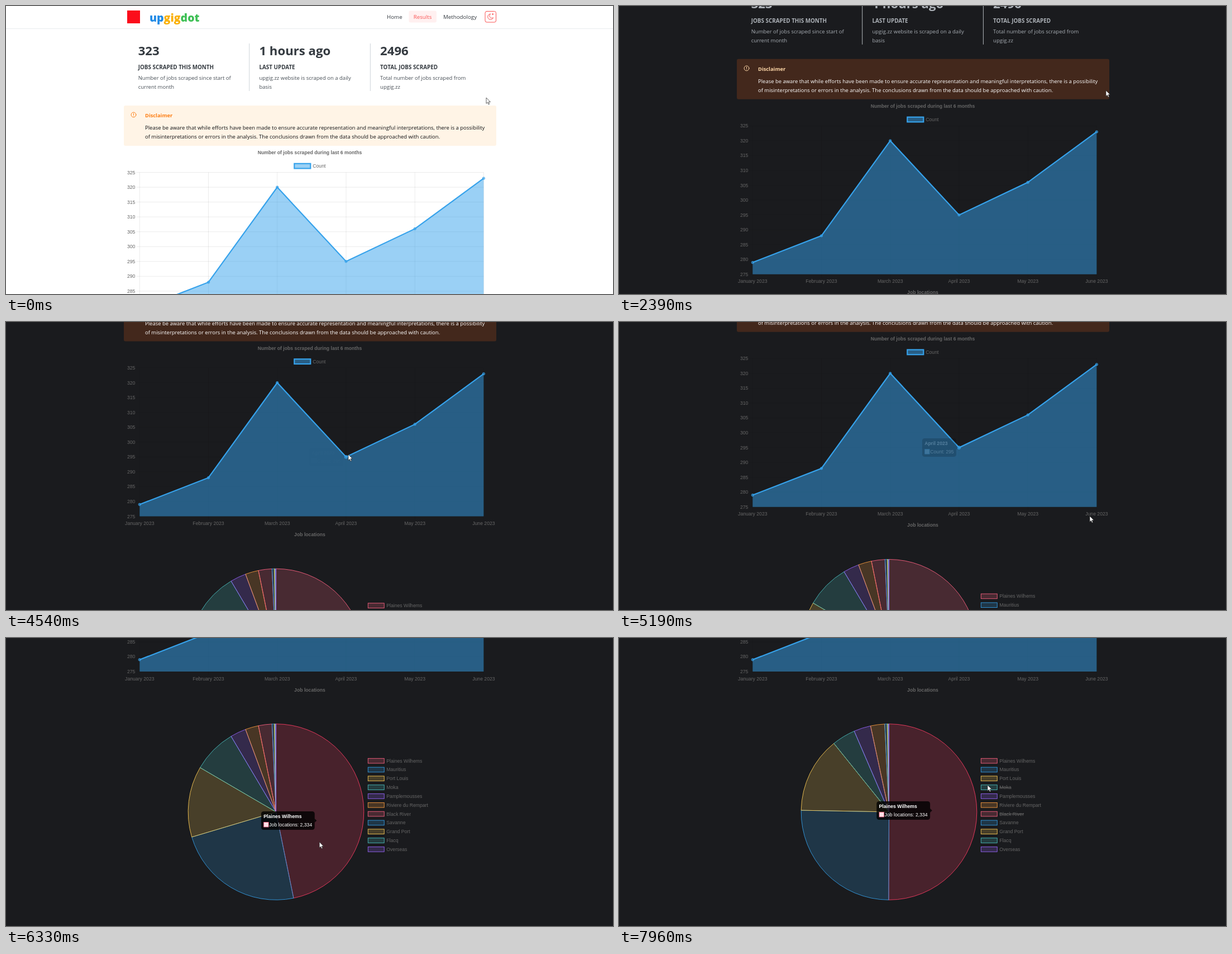
An HTML page that plays this animation: 1087x515 px, repeating every 8 s.

```html
<!DOCTYPE html>
<html lang="en">
<head>
<meta charset="utf-8">
<title>Job statistics</title>
<style>
html, body { margin: 0; width: 100%; height: 100%; overflow: hidden; background: #fff; }
svg {
  display: block; width: 100vw; height: 100vh;
  --bg: #fff; --rule: #e9ecef; --head: #343a40; --text: #495057; --divider: #ced4da;
  --nav: #343a40; --active: #fa5252; --activeBg: #fff0f0; --toggle: #fa5252;
  --alert: #fff4e6; --alertHead: #fd7e14; --alertText: #101214;
  font-family: "Open Sans", "Noto Sans", sans-serif;
}
svg.dark {
  --bg: #1a1b1e; --rule: #2c2e33; --head: #adb2b8; --text: #a6acb2; --divider: #b4b8bc;
  --nav: #c1c2c5; --active: #ffa8a8; --activeBg: #46211f; --toggle: #ff6b6b;
  --alert: #43281c; --alertHead: #ffd8a8; --alertText: #fff;
}
.bg { fill: var(--bg); }
.brand { font-size: 19.5px; font-weight: 800; }
.nav { font-size: 9.75px; font-weight: 500; fill: var(--nav); }
.big { font-size: 22.2px; font-weight: 700; fill: var(--head); }
.label { font-size: 9.9px; font-weight: 700; fill: var(--head); }
.desc { font-size: 9.5px; fill: var(--text); }
.alertHead { font-size: 9.3px; font-weight: 700; fill: var(--alertHead); }
.alertText { font-size: 9.46px; fill: var(--alertText); }
.chart { font-family: "Liberation Sans", Arial, sans-serif; font-size: 8.66px; fill: #666; }
.bold { font-weight: 700; }
.mid { text-anchor: middle; }
.end { text-anchor: end; }
.white { fill: #fff; }
.off { text-decoration: line-through; }
.sun, .dark .moon { display: none; }
.dark .sun { display: inline; }
</style>
</head>
<body>
<svg id="stage" viewBox="0 0 1087 515" preserveAspectRatio="none">
  <rect class="bg" width="1087" height="515"/>
  <g id="page">
    <g id="top"></g>
    <g id="lineChart" class="chart"></g>
    <g id="pie"></g>
    <g id="legend" class="chart"></g>
    <g id="tips" class="chart"></g>
  </g>
  <path id="cursor" d="M0 0V10.4L2.4 8.2L4 12L5.7 11.3L4.1 7.6H7.4Z" fill="#fff" stroke="#222" stroke-width=".7"/>
</svg>
<script>
const LOOP = 8000, DARK_AT = 1200, HIDE_RIVER = 6950, HIDE_MOKA = 7811;
const ENTER_PIE = 5900, ENTER_SECOND = 6015, LEAVE_SECOND = 6230;
const $ = id => document.getElementById(id);
const mix = (a, b, p) => a + (b - a) * p;
const ramp = (t, from, to) => Math.max(0, Math.min(1, (t - from) / (to - from)));
const smooth = p => p * p * (3 - 2 * p);
const outQuart = p => 1 - (1 - p) ** 4;
const fade = (t, on, off) => ramp(t, on, on + 200) - ramp(t, off, off + 200);
const rgba = (c, a = 1) => `rgba(${c},${a})`;
const tinted = (c, a, width) => `fill="${rgba(c, a)}" stroke="${rgba(c)}" stroke-width="${width}"`;
const text = (x, y, str, cls = "", more = "") => `<text x="${x}" y="${y}" class="${cls}" ${more}>${str}</text>`;
const rect = (x, y, w, h, more) => `<rect x="${x}" y="${y}" width="${w}" height="${h}" ${more}/>`;
const path = (d, more) => `<path d="${d}" ${more}/>`;

// each move: start time, end time, where it ends
const glide = (from, moves, t) => moves.reduce(
  (pos, [t0, t1, ...to]) => pos.map((v, i) => mix(v, to[i], smooth(ramp(t, t0, t1)))), from);

const cursorAt = t => glide([860, 164], [
  [260, 390, 855, 162],
  [580, 1060, 869, 18],
  [2110, 2390, 872, 151],
  [2400, 2880, 699, 213],
  [2920, 3360, 606, 243],
  [3600, 3950, 613, 237],
  [5000, 5190, 843, 347],
  [5190, 5610, 687, 310],
  [5830, 6080, 470, 400],
  [6120, 6610, 700, 311],
  [6950, 7090, 664, 290],
  [7490, 7780, 660, 263]
], t);
const scrollAt = t => glide([0], [[2165, 2699, 215.5], [5097, 5738, 503]], t)[0];

const BLUE = "54,162,235";
const palette = ["255,99,132", BLUE, "255,206,86", "75,192,192", "153,102,255", "255,159,64"];
const hoverColors = ["255,61,101", "8,153,252"];

function drawTop() {
  const stats = [
    ["323", "JOBS SCRAPED THIS MONTH", "Number of jobs scraped since start of", "current month"],
    ["1 hours ago", "LAST UPDATE", "upgig.zz website is scraped on a daily", "basis"],
    ["2496", "TOTAL JOBS SCRAPED", "Total number of jobs scraped from", "upgig.zz"]
  ].map(([big, label, a, b], i) => {
    const x = 236.7 + i * 216.7;
    return text(x, 87.5, big, "big") + text(x, 113, label, "label") +
      text(x, 132, a, "desc") + text(x, 148, b, "desc") +
      (i ? path(`M${x - 17.7} 67V152`, 'stroke="var(--divider)"') : "");
  }).join("");
  const rays = Array.from({ length: 8 }, (_, i) =>
    path("M0 -4.3V-5.6", `transform="rotate(${i * 45})"`)).join("");
  $("top").innerHTML =
    rect(0, 40, 1087, 1, 'fill="var(--rule)"') +
    rect(217, 8, 23, 23, 'fill="#fb0d1b"') +
    `<text x="257" y="27.5" class="brand"><tspan fill="#228be6">up</tspan><tspan fill="#fab005">gig</tspan><tspan fill="#40c057">dot</tspan></text>` +
    rect(721.5, 8.5, 49.5, 21, 'rx="3" fill="var(--activeBg)"') +
    text(682, 23, "Home", "nav") +
    text(746, 23, "Results", "nav mid", 'style="fill:var(--active)"') +
    text(783, 23, "Methodology", "nav") +
    `<g fill="none" stroke="var(--toggle)" stroke-linecap="round" stroke-linejoin="round">` +
    rect(858, 9.5, 19.5, 19.5, 'rx="3"') +
    path("M867.5 14.2a5 5 0 1 0 5 6.6a4.1 4.1 0 0 1 -5 -6.6M870.5 14.6h2.4m-1.2 -1.2v2.4", 'class="moon"') +
    `<g class="sun" transform="translate(867.8 19.2)"><circle r="2.4"/>${rays}</g></g>` +
    stats +
    rect(211, 178, 667, 72, 'rx="3" fill="var(--alert)"') +
    `<g fill="none" stroke="var(--alertHead)" stroke-linecap="round"><circle cx="228.5" cy="194.5" r="4.4"/><path d="M228.5 192.2V194.8M228.5 196.6V196.7"/></g>` +
    text(249, 199, "Disclaimer", "alertHead") +
    text(249, 221.3, "Please be aware that while efforts have been made to ensure accurate representation and meaningful interpretations, there is a possibility", "alertText") +
    text(249, 237, "of misinterpretations or errors in the analysis. The conclusions drawn from the data should be approached with caution.", "alertText");
}

const months = ["January", "February", "March", "April", "May", "June"];
const counts = [279, 288, 320, 295, 306, 323];
const monthX = i => 239.3 + i * 123.22;
const countY = v => 563 - (v - 275) * 5.31;

function drawLineChart() {
  const grid = 'stroke="rgba(0,0,0,.1)" stroke-width=".8"';
  let out = text(544, 265, "Number of jobs scraped during last 6 months", "bold mid") +
    rect(516.3, 281.8, 29, 8.7, tinted(BLUE, 0.5, 2.17)) + text(549.3, 289, "Count");
  for (let v = 275; v <= 325; v += 5) {
    out += path(`M233.5 ${countY(v)}H${monthX(5)}`, grid) + text(231.4, countY(v) + 3, v, "end");
  }
  months.forEach((m, i) => {
    out += path(`M${monthX(i)} 297.5V568.5`, grid) + text(monthX(i), 578.5, m + " 2023", "mid");
  });
  const curve = "M" + counts.map((v, i) => `${monthX(i)} ${countY(v)}`).join("L");
  out += path(`${curve}V563H${monthX(0)}Z`, `fill="${rgba(BLUE, 0.5)}"`) +
    path(curve, tinted(BLUE, 0, 2.17));
  counts.forEach((v, i) => {
    out += `<circle id="dot${i}" cx="${monthX(i)}" cy="${countY(v)}" r="2.2" ${tinted(BLUE, 0.5, 0.8)}/>`;
  });
  $("lineChart").innerHTML = out + text(544, 598.5, "Job locations", "bold mid");
}

const places = ["Plaines Wilhems", "Mauritius", "Port Louis", "Moka", "Pamplemousses",
  "Riviere du Rempart", "Black River", "Savanne", "Grand Port", "Flacq", "Overseas"];
const jobs = [2334, 1177, 649, 402, 145, 121, 124, 20, 8, 5, 3];
const MOKA = 3, RIVER = 6;
const CX = 483.5, CY = 814, R = 157.3;
const polar = (angle, r) => [CX + r * Math.sin(angle), CY - r * Math.cos(angle)];

function shares(...hidden) {
  const shown = jobs.map((n, i) => hidden.includes(i) ? 0 : n);
  const total = shown.reduce((a, b) => a + b);
  return shown.map(n => n / total * 2 * Math.PI);
}
const stages = [shares(), shares(RIVER), shares(RIVER, MOKA)];

// slices while the first place (a) and then the second (b) are being hidden
function slices(a, b) {
  let from = 0;
  return jobs.map((_, i) => {
    const size = mix(mix(stages[0][i], stages[1][i], a), stages[2][i], b);
    from += size;
    return { from: from - size, size };
  });
}

function drawPie(a, b, hovered) {
  $("pie").innerHTML = slices(a, b).map(({ from, size }, i) => {
    if (size < 1e-4) return "";
    const c = i === hovered ? hoverColors[i] : palette[i % palette.length];
    const arc = `A${R} ${R} 0 ${+(size > Math.PI)} 1 ${polar(from + size, R)}`;
    return path(`M${CX} ${CY}L${polar(from, R)}${arc}Z`, tinted(c, 0.2, 0.85) + ' stroke-linejoin="bevel"');
  }).join("");
}

function drawLegend() {
  $("legend").innerHTML = places.map((name, i) => {
    const y = 722.6 + i * 15.82;
    return rect(648.3, y - 4.3, 28.9, 8.7, tinted(palette[i % palette.length], 0.2, 0.85)) +
      text(681.3, y + 3, name, "", `id="place${i}"`);
  }).join("");
}

// side 1 puts the box left of the anchor, side -1 right of it
const tipX = (anchor, w, side) => side > 0 ? anchor - 5 - w : anchor + 5;

function tip(x, cy, w, side, title, body, color, tint, alpha) {
  const y = cy - 16.5, edge = side > 0 ? x + w : x;
  return `<g opacity="${alpha}">` +
    rect(x, y, w, 33, 'rx="4.3" fill="rgba(0,0,0,.8)"') +
    path(`M${edge} ${cy - 3.6}l${side * 3.6} 3.6l${-side * 3.6} 3.6Z`, 'fill="rgba(0,0,0,.8)"') +
    text(x + 4.3, y + 11.7, title, "bold white") +
    rect(x + 4.7, y + 19.6, 8.4, 8.4, 'class="white"') +
    rect(x + 4.7, y + 19.6, 8.4, 8.4, tinted(color, tint, 0.8)) +
    text(x + 14.3, y + 26.8, body, "white") + "</g>";
}

function drawTips(t, a, b, hovered) {
  const lineAlpha = fade(t, 3600, 3750) + fade(t, 4540, 5030);
  $("dot3").setAttribute("r", lineAlpha > 0 ? 2.9 : 2.2);
  let out = tip(tipX(monthX(3), 61, 1), countY(295), 61, 1, "April 2023", "Count: 295", BLUE, 0.5, lineAlpha);
  if (hovered >= 0) {
    const w = 95.8;
    const [first, second] = slices(a * a, b * b).map(s => polar(s.from + s.size / 2, R / 2));
    const away = outQuart(ramp(t, ENTER_SECOND, ENTER_SECOND + 400)) -
      outQuart(ramp(t, LEAVE_SECOND, LEAVE_SECOND + 400));
    out += tip(mix(tipX(first[0], w, 1), tipX(second[0], w, -1), away), mix(first[1], second[1], away),
      w, hovered ? -1 : 1, places[hovered], "Job locations: " + jobs[hovered].toLocaleString("en-US"),
      palette[hovered], 0.2, ramp(t, ENTER_PIE, ENTER_PIE + 200));
  }
  $("tips").innerHTML = out;
}

function render(t) {
  const a = outQuart(ramp(t, HIDE_RIVER, HIDE_RIVER + 1000));
  const b = outQuart(ramp(t, HIDE_MOKA, HIDE_MOKA + 1000));
  const hovered = t < ENTER_PIE ? -1 : +(t >= ENTER_SECOND && t < LEAVE_SECOND);
  $("stage").setAttribute("class", t >= DARK_AT ? "dark" : "");
  $("page").setAttribute("transform", `translate(0 ${-scrollAt(t)})`);
  $("cursor").setAttribute("transform", `translate(${cursorAt(t)})`);
  $("place" + RIVER).setAttribute("class", t >= HIDE_RIVER ? "off" : "");
  $("place" + MOKA).setAttribute("class", t >= HIDE_MOKA ? "off" : "");
  drawPie(a, b, hovered);
  drawTips(t, a, b, hovered);
}

drawTop();
drawLineChart();
drawLegend();
const start = performance.now();
function frame() {
  render((performance.now() - start) % LOOP);
  requestAnimationFrame(frame);
}
frame();
</script>
</body>
</html>
```
